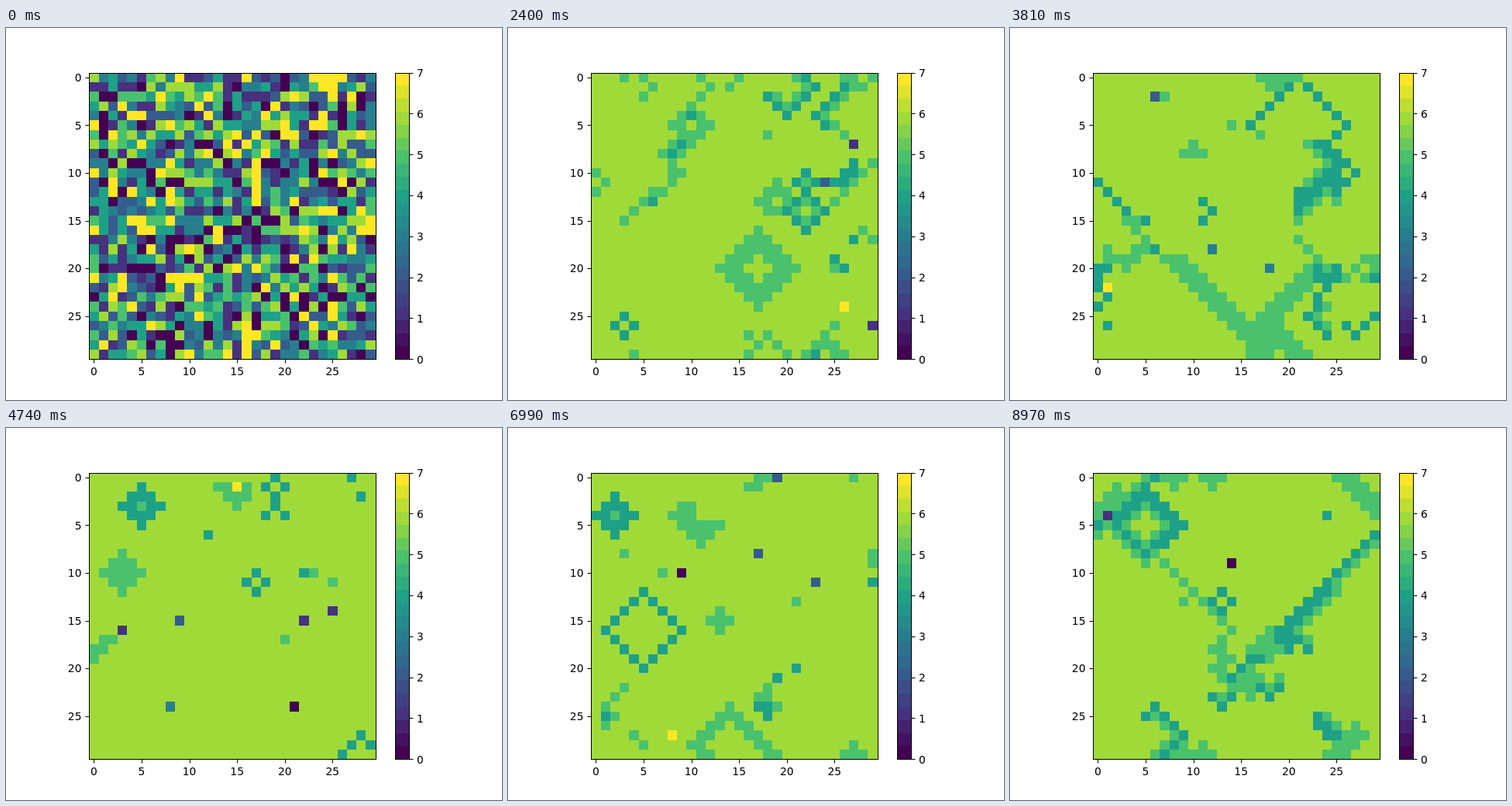
Write an HTML page with a canvas that moves like this. It is 640 px wide and 480 px high and loops after 9000 ms.

```html
<!DOCTYPE html>
<html>
<head>
<meta charset="utf-8">
<style>
html, body { margin: 0; width: 100%; height: 100%; overflow: hidden; background: #fff; }
canvas { display: block; }
</style>
</head>
<body>
<canvas id="stage" width="640" height="480"></canvas>
<script>
const ctx = document.getElementById('stage').getContext('2d');
const N = 30, STEPS = 300, STEP_MS = 30;
const LEFT = 107.2, TOP = 57.6, SIZE = 369.6, CELL = SIZE / N;
const BAR_LEFT = 502, BAR_RIGHT = 520, BANDS = 22;
const COLORS = [
  [68, 1, 84], [70, 50, 126], [54, 92, 141], [39, 127, 142],
  [31, 161, 135], [74, 193, 109], [160, 218, 57], [253, 231, 37]
];
const REST = 6, MUTATION_RATE = 0.005, RECOVERY = 5;
// Values a cell passes through while a wave crosses it
const WAVES = [[5, 5], [5, 5], [4, 6], [4, 5], [5, 5, 5], [4, 4, 5]];

let seed = 20;
function random() {
  seed = (seed + 0x6D2B79F5) | 0;
  let r = Math.imul(seed ^ (seed >>> 15), 1 | seed);
  r = (r + Math.imul(r ^ (r >>> 7), 61 | r)) ^ r;
  return ((r ^ (r >>> 14)) >>> 0) / 4294967296;
}
const pick = n => Math.floor(random() * n);

function neighbours(i) {
  const x = i % N, y = (i - x) / N;
  return [
    y * N + (x + 1) % N, y * N + (x + N - 1) % N,
    (y + 1) % N * N + x, (y + N - 1) % N * N + x
  ];
}

// Mutations send out diamond waves that cancel where they meet
function advance(cells) {
  return cells.map((cell, i) => {
    let { value, age, wave, reach } = cell;
    const mutates = random() < MUTATION_RATE;
    if (age) {
      age = (age + 1) % (RECOVERY + 1);
    } else {
      const source = neighbours(i).map(k => cells[k]).find(c => c.age === 1 && c.reach > 0);
      if (source) {
        age = 1;
        wave = source.wave;
        reach = source.reach - 1;
      } else if (mutates) {
        age = 1;
        wave = WAVES[pick(WAVES.length)];
        reach = 6 + pick(7);
      }
    }
    if (mutates) value = pick(8);
    else if (age) value = wave[age - 1] || REST;
    else value += Math.sign(REST - value);
    return { value, age, wave, reach };
  });
}

const history = [Array.from({ length: N * N }, () => ({ value: pick(8), age: 0, wave: WAVES[0], reach: 0 }))];
while (history.length < STEPS) history.push(advance(history[history.length - 1]));

function color(value) {
  const i = Math.min(6, Math.floor(value)), f = value - i;
  return `rgb(${COLORS[i].map((c, k) => Math.round(c + (COLORS[i + 1][k] - c) * f))})`;
}

const snap = v => Math.floor(v + 0.5) + 0.5;
const baseline = y => Math.round(y + 5.3);

function line(x1, y1, x2, y2) {
  ctx.beginPath();
  ctx.moveTo(x1, y1);
  ctx.lineTo(x2, y2);
  ctx.stroke();
}

function label(text, x, y, align) {
  ctx.fillStyle = '#000';
  ctx.textAlign = align;
  ctx.fillText(text, x, y);
}

function drawAxes() {
  ctx.fillStyle = '#fff';
  ctx.fillRect(0, 0, 640, 480);
  ctx.font = '13.89px "DejaVu Sans", sans-serif';
  ctx.strokeStyle = '#000';
  ctx.lineWidth = 1;

  for (let k = 0; k < N; k += 5) {
    const offset = CELL * (k + 0.5), x = LEFT + offset, y = TOP + offset;
    line(snap(x), 428, snap(x), 432.5);
    label(k, x, 448, 'center');
    line(102.5, snap(y), 107, snap(y));
    label(k, 97.5, baseline(y), 'right');
  }

  for (let b = 0; b < BANDS; b++) {
    const y1 = Math.round(TOP + SIZE * (1 - (b + 1) / BANDS));
    const y2 = Math.round(TOP + SIZE * (1 - b / BANDS));
    ctx.fillStyle = color(b * 7 / (BANDS - 1));
    ctx.fillRect(BAR_LEFT, y1, BAR_RIGHT - BAR_LEFT, y2 - y1);
  }
  ctx.strokeRect(BAR_LEFT + 0.5, 58.5, BAR_RIGHT - BAR_LEFT, 369);
  for (let k = 0; k <= 7; k++) {
    const y = TOP + SIZE * (1 - k / 7);
    line(521, snap(y), 525.5, snap(y));
    label(k, 530, baseline(y), 'left');
  }
}

function drawCells(cells) {
  cells.forEach(({ value }, i) => {
    const col = i % N, row = (i - col) / N;
    const x = Math.round(LEFT + CELL * col), y = Math.round(TOP + CELL * row);
    ctx.fillStyle = color(value);
    ctx.fillRect(x, y, Math.round(LEFT + CELL * (col + 1)) - x, Math.round(TOP + CELL * (row + 1)) - y);
  });
  ctx.strokeRect(107.5, 58.5, 370, 369);
}

const start = performance.now();
function frame() {
  const elapsed = performance.now() - start;
  drawCells(history[Math.floor(elapsed / STEP_MS) % STEPS]);
  requestAnimationFrame(frame);
}
drawAxes();
frame();
</script>
</body>
</html>
```
